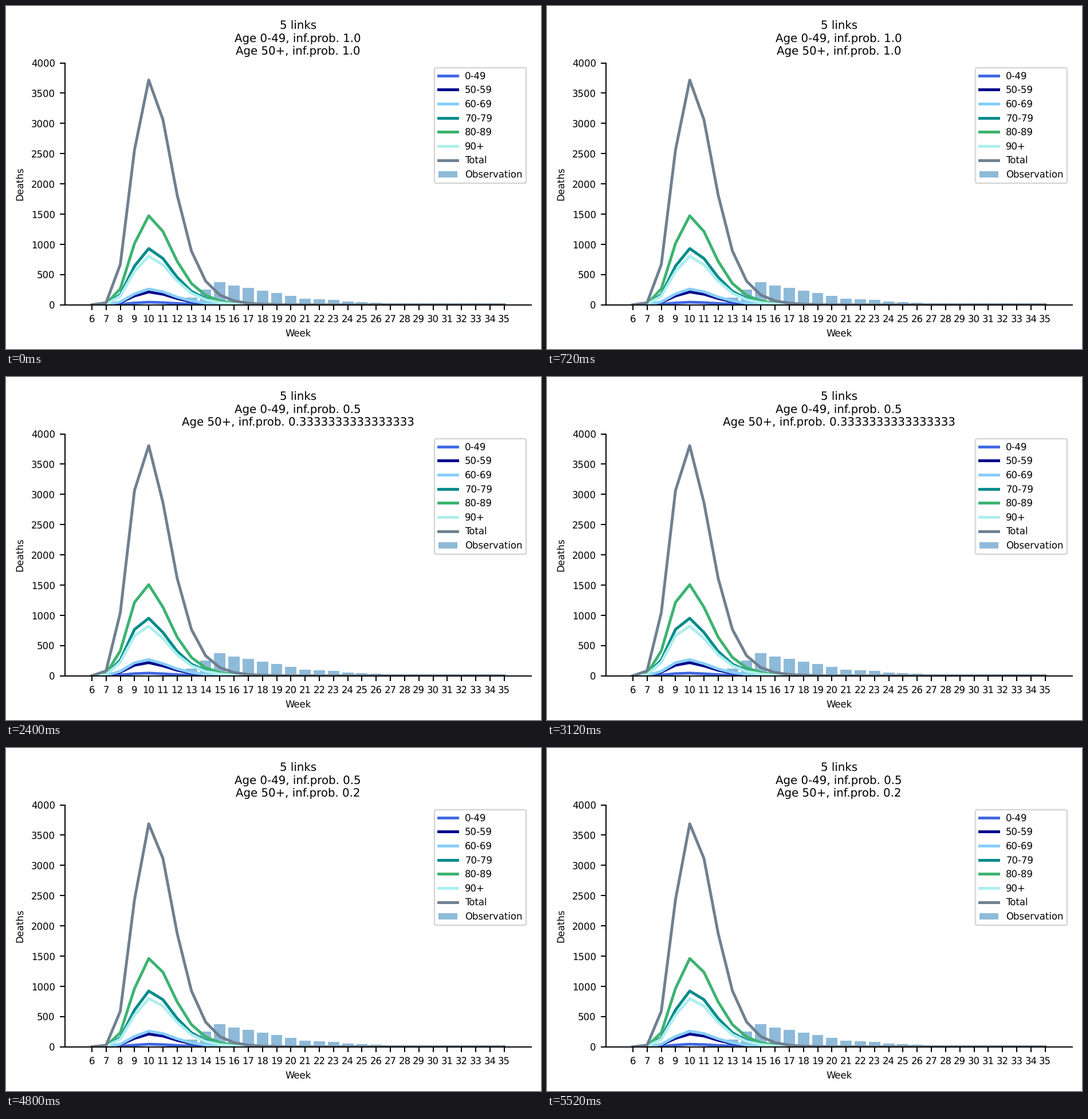
Recreate the animation shown at these times as a matplotlib script. Size 934 by 600 pixels, loop 6000 ms.

```python
import numpy as np
import matplotlib.pyplot as plt
from matplotlib.animation import FuncAnimation

K = 1.78  # scale of lines, ticks and paddings
FONT = 11.88

plt.rcParams.update({
    "font.family": "DejaVu Sans",
    "font.size": FONT,
    "text.hinting": "no_hinting",
    "axes.titlesize": 1.2 * FONT,
    "axes.linewidth": 0.8 * K,
    "axes.labelpad": 4 * K,
    "axes.titlepad": 6 * K,
    "axes.spines.top": False,
    "axes.spines.right": False,
    "patch.linewidth": K,
    "lines.linewidth": 2 * K,
})
for axis in ("xtick", "ytick"):
    plt.rcParams.update({
        f"{axis}.major.size": 3.5 * K,
        f"{axis}.major.width": 0.8 * K,
        f"{axis}.major.pad": 3.5 * K,
    })

WEEKS = np.arange(6, 36)
# Label: colour and share of all deaths
GROUPS = {
    "0-49": ("royalblue", 0.0114),
    "50-59": ("darkblue", 0.057),
    "60-69": ("lightskyblue", 0.07),
    "70-79": ("darkcyan", 0.25),
    "80-89": ("mediumseagreen", 0.396),
    "90+": ("paleturquoise", 0.216),
    "Total": ("slategray", 1),
}
# Deaths in week 10 and steepness of the outbreak
RUNS = [(3717, 1.86), (3513, 2.01), (3806, 1.645), (3350, 2.12), (3688, 1.92)]


def epidemic(peak, steep):
    """Weekly deaths whose growth rate slows geometrically to a steady decay."""
    t = WEEKS - 10
    return peak * np.exp(steep * (1 - 0.58 ** t) - 0.975 * t)


fig = plt.figure(figsize=(9.34, 6), dpi=100)
ax = fig.add_axes([103 / 934, 77.4 / 600, 813.5 / 934, 423 / 600])
lines = [ax.plot(WEEKS, 0 * WEEKS, color=color, label=label)[0]
         for label, (color, _) in GROUPS.items()]
observed = np.interp(WEEKS, [11, 12, 13, 15, 16, 18, 21, 23, 24, 28, 32],
                     [0, 30, 120, 376, 317, 236, 102, 82, 52, 8, 0])
ax.bar(WEEKS, observed, color="tab:blue", alpha=0.5, linewidth=0,
       label="Observation")

ax.set_xlim(4.11, 36.89)
ax.set_ylim(0, 4000)
ax.set_xticks(WEEKS)
ax.set_xlabel("Week")
ax.set_ylabel("Deaths")
ax.legend(loc="upper right")
title = ax.set_title("")


def update(i):
    total = epidemic(*RUNS[i])
    for line, (_, share) in zip(lines, GROUPS.values()):
        line.set_ydata(share * total)
    young, old = 1 / min(i + 1, 2), 1 / (i + 1)
    title.set_text(f"5 links\nAge 0-49, inf.prob. {young}\n"
                   f"Age 50+, inf.prob. {old}")
    return [*lines, title]


anim = FuncAnimation(fig, update, frames=len(RUNS), interval=1200,
                     repeat=True, repeat_delay=0, blit=False)
plt.show()
```
